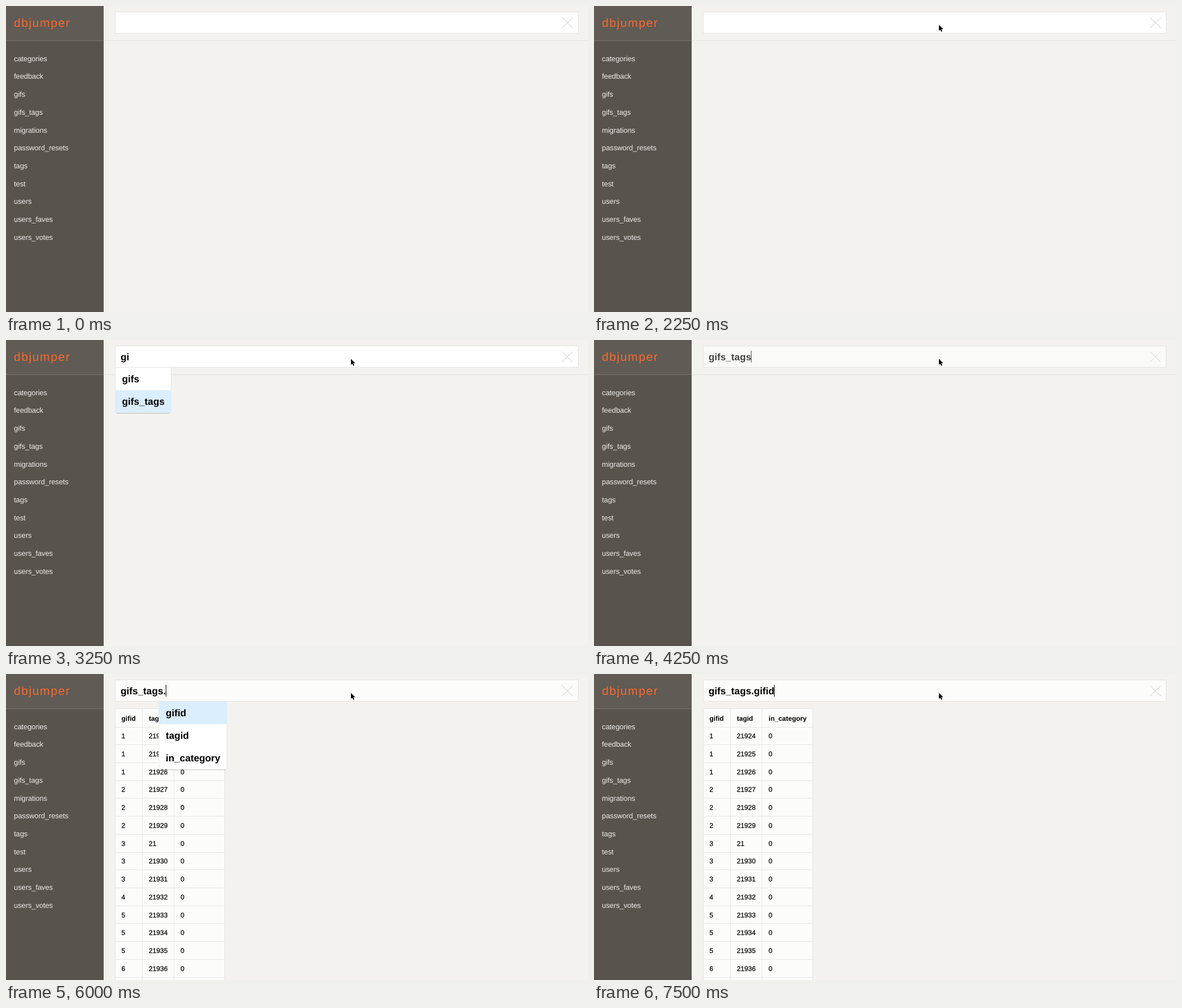
An HTML page for the animation above (8000 ms loop, 1031 by 543 pixels).

```html
<!DOCTYPE html>
<html lang="en">
<head>
<meta charset="utf-8">
<title>dbjumper</title>
<style>
  html, body { margin: 0; width: 100%; height: 100%; overflow: hidden; background: #f3f2ee; }
  svg { display: block; font-family: "Liberation Sans", Arial, sans-serif; text-rendering: geometricPrecision; }
  .logo { font-size: 21px; letter-spacing: 1.6px; fill: #fa6a2e; }
  .nav { font-size: 13px; letter-spacing: -.1px; fill: #edebe7; }
  .big { font-size: 17.2px; font-weight: bold; }
  .cell { font-size: 12px; stroke: #000; stroke-width: .25px; }
  .head { font-size: 12px; font-weight: bold; }
</style>
</head>
<body>
<svg id="stage" width="1031" height="543">
  <rect width="1031" height="543" fill="#f3f2ee"/>
  <path id="rule" d="M173 61.5H1031" stroke="#e2e1dd"/>
  <rect width="173" height="543" fill="#59534e"/>
  <rect width="173" height="61" fill="#605b55"/>
  <path d="M0 61.5H173" stroke="#7b766f"/>
  <text class="logo" x="14" y="37">dbjumper</text>
  <g id="nav"></g>
  <g id="table"></g>
  <rect id="box" x="193.5" y="10.5" width="820" height="38" stroke="#e4e3e0"/>
  <path id="clear" d="M985 20.5l19 18.5M1004 20.5l-19 18.5" stroke="#c9c9c8" fill="none"/>
  <text id="query" class="big" x="203" y="36"></text>
  <rect id="caret" y="19" width="1" height="21"/>
  <g id="menu"></g>
  <path id="pointer" d="M0 0V10.6L2.4 8.4 4.2 12.3 6 11.5 4.3 7.7H7.6Z"
        stroke="#fff" stroke-width="1.6" paint-order="stroke"/>
</svg>
<script>
const $ = id => document.getElementById(id);
const LOOP = 8000, ROW = 31.72;
const COLUMNS = ["gifid", "tagid", "in_category"];

const text = (cls, x, y, str) => `<text class="${cls}" x="${x}" y="${y}">${str}</text>`;

$("nav").innerHTML = ["categories", "feedback", "gifs", "gifs_tags", "migrations", "password_resets",
  "tags", "test", "users", "users_faves", "users_votes"]
  .map((name, i) => text("nav", 14, 97.7 + i * ROW, name)).join("");

function buildTable() {
  const xs = [204.5, 253, 309.3];
  const gifIds = [1, 1, 1, 2, 2, 2, 3, 3, 3, 4, 5, 5, 5, 6];
  let tag = 21924, lines = "M193.5 61.5H387.5V544M193.5 61.5V544M241.5 61V544M297.5 61V544";
  let out = "";
  gifIds.forEach((id, i) => {
    const row = [id, i === 6 ? 21 : tag++, 0];
    out += row.map((v, c) => text("cell", xs[c], 114.3 + i * ROW, v)).join("");
  });
  for (let i = 0; i <= gifIds.length; i++) lines += `M193 ${Math.floor(94 + i * ROW) + .5}H388`;
  return `<rect x="193" y="61" width="195" height="482" fill="#fcfcfb"/>
    <path d="${lines}" fill="none" stroke="#e5e5e2"/>` +
    COLUMNS.map((name, c) => text("head", xs[c], 82.5, name)).join("") + out;
}
$("table").innerHTML = buildTable();

function buildMenu({ x, w, items, pick = 0 }) {
  const h = items.length * 40;
  return `<rect x="${x + 2}" y="51" width="${w - 4}" height="${h}" rx="3" opacity=".13"/>
    <rect x="${x}" y="49" width="${w}" height="${h}" fill="#fff"/>
    <path d="M${x + .5} 49v${h}m${w - 1} 0v${-h}" stroke="#e6e6e4"/>
    <rect x="${x}" y="${49 + pick * 40}" width="${w}" height="40" fill="#dbeefd"/>` +
    items.map((s, i) => text("big", x + 12.5, 75 + i * 40, s)).join("");
}

const tables = { x: 193, w: 100, items: ["gifs", "gifs_tags"] };
const tablesNext = { ...tables, pick: 1 };
const columns = { x: 270.5, w: 121, items: COLUMNS };
const match = { x: 270.5, w: 61, items: ["gifid"] };

// start time, query, caret visible, menu
const steps = [
  [0, "", 0],
  [750, "", 1],
  [1250, "", 0],
  [1750, "", 1],
  [2250, "", 0],
  [2500, "gi", 1, tables],
  [3000, "gi", 0, tables],
  [3250, "gi", 0, tablesNext],
  [3500, "gifs_tags", 1],
  [4000, "gifs_tags", 0],
  [4250, "gifs_tags", 1],
  [5000, "gifs_tags", 0],
  [5500, "gifs_tags", 1],
  [6000, "gifs_tags.", 1, columns],
  [6250, "gifs_tags.f", 1],
  [6750, "gifs_tags.f", 0],
  [7000, "gifs_tags.gi", 1, match],
  [7500, "gifs_tags.gifid", 1]
];

const show = (id, on) => $(id).setAttribute("visibility", on ? "visible" : "hidden");
let current;

function draw(t) {
  const step = steps.findLast(s => s[0] <= t);
  const loaded = t >= 4500, loading = t >= 4250 && !loaded;

  show("pointer", t >= 500);
  $("pointer").setAttribute("transform", t < 750 ? "translate(614.5 24)" : "translate(611 33.5)");
  show("table", loaded);
  show("rule", !loaded);
  $("box").setAttribute("fill", loading ? "#fafaf8" : loaded ? "#fcfcfb" : "#fff");
  for (const id of ["query", "caret", "clear"]) $(id).setAttribute("opacity", loading ? .72 : 1);

  if (step === current) return;
  current = step;
  const [, query, caret, menu] = step;
  $("query").textContent = query;
  const width = query ? $("query").getComputedTextLength() : 0;
  $("caret").setAttribute("x", Math.floor(203.4 + width));
  show("caret", caret);
  $("menu").innerHTML = menu ? buildMenu(menu) : "";
}

const start = performance.now();
function frame() {
  draw((performance.now() - start) % LOOP);
  requestAnimationFrame(frame);
}
frame();
</script>
</body>
</html>
```
